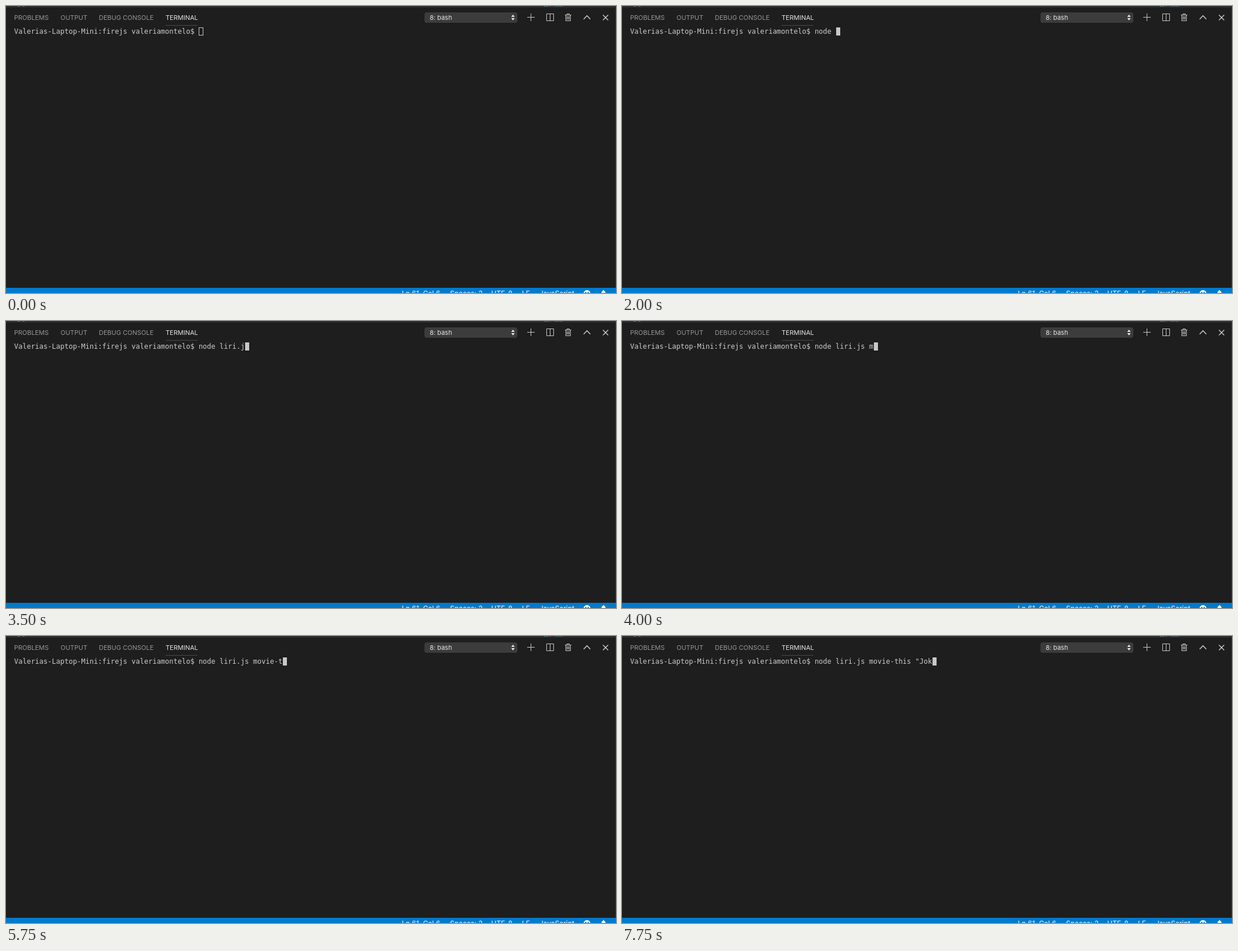
Animation, 1051 px wide and 496 px high, one loop 8 s. Source, as an HTML page:

```html
<!DOCTYPE html>
<html lang="en">
<head>
<meta charset="utf-8">
<title>Terminal</title>
<style>
  html, body { margin: 0; width: 100%; height: 100%; overflow: hidden; background: #1e1e1e; }
  svg { display: block; }
  text { white-space: pre; }
  .ui { font: 11px Inter, "Liberation Sans", sans-serif; fill: #979797; }
  .ui .on { fill: #e7e7e7; }
  .status { font: 12px Inter, "Liberation Sans", sans-serif; fill: #fff; }
  .term { font: 12px "DejaVu Sans Mono", monospace; fill: #ccc; }
  .icon { fill: none; stroke: #c8c8c8; }
  .icon .slant { stroke: #d8d8d8; stroke-width: 1.3; }
</style>
</head>
<body>
<svg width="1051" height="496" viewBox="0 0 1051 496">
  <rect width="1051" height="496" fill="#1e1e1e"/>

  <!-- editor remnants and panel borders -->
  <path d="M20 .5h5M28 .5h4" stroke="#555"/>
  <path d="M927 .5h7" stroke="#2f7f78" stroke-dasharray="3 1"/>
  <path d="M936 .5h3M945 .5h14" stroke="#4a6478" stroke-dasharray="2 1"/>
  <path d="M0 1.5H1051" stroke="#424242"/>
  <path d="M1050.5 2V487" stroke="#343434"/>

  <g class="ui">
    <text x="14" y="24">PROBLEMS</text>
    <text x="94" y="24">OUTPUT</text>
    <text x="160" y="24">DEBUG CONSOLE</text>
    <text x="275" y="24" class="on">TERMINAL</text>
    <path d="M275 33.5h55" stroke="#484848"/>
    <rect x="721" y="11" width="160" height="18" rx="4" fill="#3c3c3c"/>
    <text x="730" y="24" class="on">8: bash</text>
    <path d="M870.5 18.7l3-3.7l3 3.7zM870.5 21l3 3.7l3-3.7z" fill="#f0f0f0"/>
  </g>

  <g class="icon">
    <path d="M898 19.5h13M904.5 13v13"/>
    <path d="M931.5 13.5h12v12h-12zM937.5 13.5v12"/>
    <path d="M963 15.5h11M966.5 15v-1.5h4V15M964.5 16v9.5h8V16M966.5 17.5v6M968.5 17.5v6M970.5 17.5v6"/>
    <path class="slant" d="M995.3 22.7l5.7-5.9l5.7 5.9"/>
    <path class="slant" d="M1028.5 15.5l9 9m0-9l-9 9"/>
  </g>

  <text class="term" id="line" x="14" y="48"></text>
  <rect id="caret" y="37" height="14" fill="#c8c8c8"/>
  <rect id="hollow" x="332.5" y="37.5" width="7" height="13" fill="none" stroke="#c8c8c8"/>
  <path id="beam" fill="none" stroke="#fff"
    d="M2.5 1.5q3 0 3 2.5v9q0 2.5-3 2.5M8.5 1.5q-3 0-3 2.5m0 9q0 2.5 3 2.5M4 11.5h3"/>

  <rect y="487" width="1051" height="9" fill="#007acc"/>
  <g class="status">
    <text x="682" y="501">Ln 61, Col 6</text>
    <text x="765" y="501">Spaces: 2</text>
    <text x="836" y="501">UTF-8</text>
    <text x="889" y="501">LF</text>
    <text x="919" y="501">JavaScript</text>
    <circle cx="1001" cy="497" r="6"/>
    <path d="M998 494h2v2h-2zm4 0h2v2h-2z" fill="#007acc"/>
    <path d="M1029.5 491q1 0 1 1q2.5 .8 2.5 4v3h-7v-3q0-3.2 2.5-4q0-1 1-1z"/>
  </g>
</svg>
<script>
  const LOOP = 8000, TICK = 250, FOCUS = 3;
  const LEFT = 14, CHAR = 7.2246;
  const PROMPT = 'Valerias-Laptop-Mini:firejs valeriamontelo$ ';
  const COMMAND = 'node liri.js movie-this "Jok';

  // Typing pace: [tick, characters], steady between the points
  const pace = [[6, 0], [7, 3.2], [12, 10.4], [13, 10.4], [16, 13.52], [22, 18.4], [24, 22.3], [30, 25.9], [31, 28]];

  const el = id => document.getElementById(id);
  const line = el('line'), caret = el('caret'), hollow = el('hollow'), beam = el('beam');
  const show = (node, on) => node.setAttribute('visibility', on ? 'visible' : 'hidden');

  function typedAt(tick) {
    const i = pace.findIndex(([end]) => tick <= end);
    if (i < 1) return 0;
    const [t0, n0] = pace[i - 1], [t1, n1] = pace[i];
    return Math.round(n0 + (n1 - n0) * (tick - t0) / (t1 - t0));
  }

  // The pointer slows down towards its resting place
  function pointerAt(tick) {
    const rest = (1 / 6) ** (tick - 1);
    return [396 + 8 * rest, 53 + 32 * rest].map(Math.round);
  }

  function draw(tick) {
    const text = PROMPT + COMMAND.slice(0, typedAt(tick));
    if (line.textContent !== text) line.textContent = text;

    const edge = n => Math.ceil(LEFT + n * CHAR);
    caret.setAttribute('x', edge(text.length));
    caret.setAttribute('width', edge(text.length + 1) - edge(text.length));
    show(caret, tick >= FOCUS);
    show(hollow, tick < FOCUS);

    show(beam, tick >= 1 && tick <= FOCUS);
    beam.setAttribute('transform', `translate(${pointerAt(tick)})`);
  }

  function loop() {
    draw(Math.floor(performance.now() % LOOP / TICK));
    requestAnimationFrame(loop);
  }
  loop();
</script>
</body>
</html>
```
